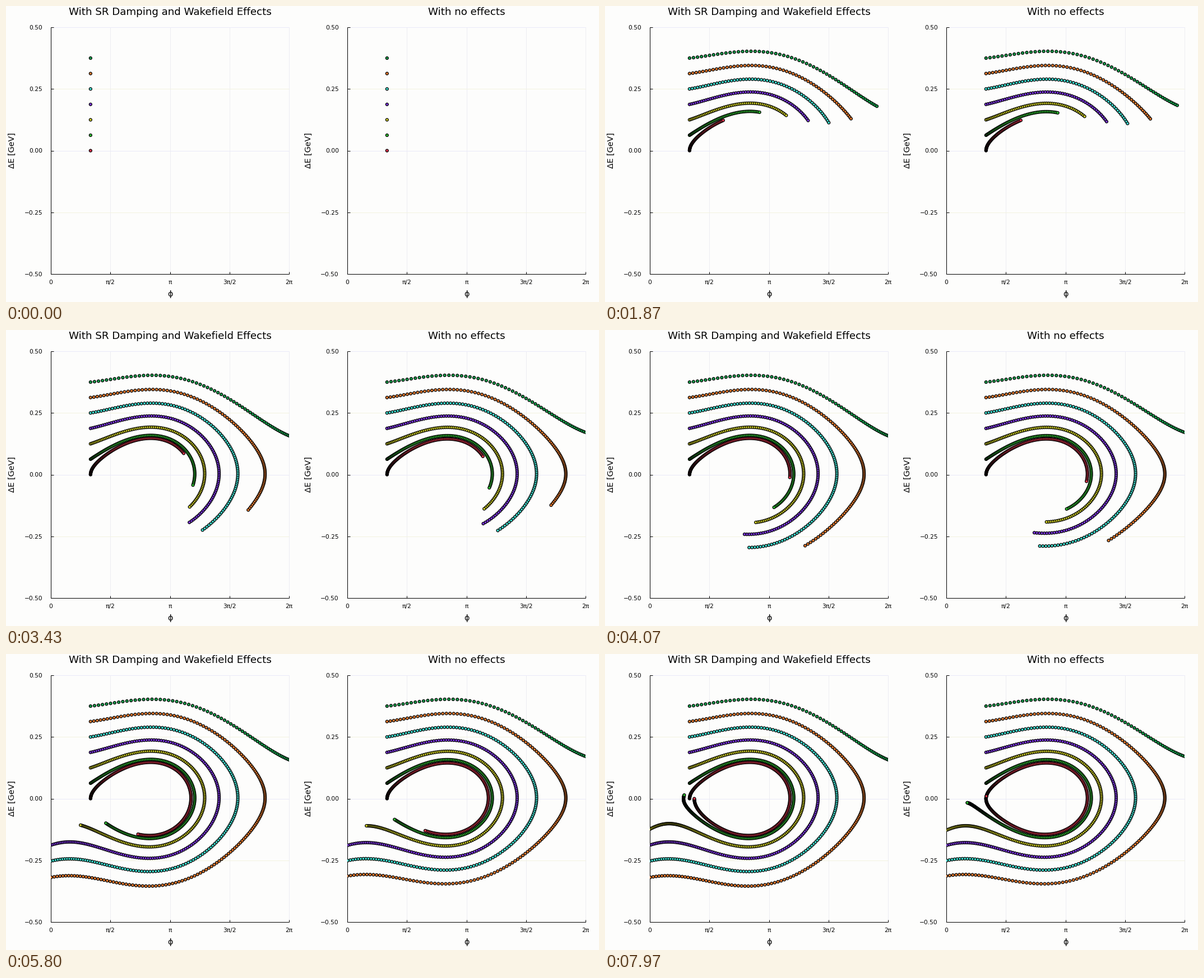
A matplotlib script for the animation above (8 s loop, 1058 by 529 pixels).

```python
import numpy as np
import matplotlib.pyplot as plt
from matplotlib.animation import FuncAnimation
from matplotlib.patches import Rectangle

W, H, DPI = 1058, 529, 100
TURNS, LOOP_MS = 240, 8000
TOP, BOTTOM, WIDTH = 38, 479, 425
BACK = "#fdfdfc"

# Ring constants, energies in GeV
VOLT = 0.005
PHI_S = 5 * np.pi / 6
SLIP = 2 * np.pi * 360 * 3.68e-4
RING_E = 3.0
RADIUS = 250

COLORS = ["#e0324b", "#2fbe32", "#cfcf28", "#7a35dc",
          "#3fdccd", "#e67a2e", "#14a04b"]


def track(effects):
    """Phase and energy offset of every particle on every turn."""
    n = len(COLORS)
    phi = np.full(n, np.pi / 3)
    dE = np.arange(n) / 16
    ref = RING_E
    turns = [(phi, dE)]
    for _ in range(TURNS - 1):
        dE = dE + VOLT * (np.sin(phi) - np.sin(PHI_S))
        if effects:
            dE = dE * (1 - 4 * 8.85e-5 * ref**3 / RADIUS)
            ref += VOLT * np.sin(PHI_S)
        phi = phi + SLIP / ref * dE
        turns.append((phi, dE))
    return np.array(turns)


def to_y(energy):
    return (TOP + BOTTOM) / 2 - (BOTTOM - TOP) * energy


def pt(px):
    return px * 72 / DPI


fig = plt.figure(figsize=(W / DPI, H / DPI), dpi=DPI, facecolor=BACK)
ax = fig.add_axes([0, 0, 1, 1])
ax.set(xlim=(0, W), ylim=(H, 0))
ax.axis("off")


def label(x, y, text, px, ha="center", **kw):
    ax.text(x, y, text, fontsize=pt(px), family="DejaVu Sans", ha=ha,
            va="baseline", color="black", **kw)


def line(xs, ys, color, z):
    ax.plot(xs, ys, color=color, lw=pt(1), zorder=z, snap=True,
            solid_capstyle="butt")


class Panel:
    def __init__(self, x0, title, effects):
        self.draw_frame(x0, title)
        path = track(effects)
        phi, dE = path[:, 0], path[:, 1]
        seen = (phi > -0.1) & (phi < 2 * np.pi + 0.1)
        x = x0 + WIDTH * phi / (2 * np.pi)
        self.points = np.column_stack([x[seen], to_y(dE)[seen]])
        self.counts = np.cumsum(seen.sum(axis=1))
        colors = np.tile(COLORS, (TURNS, 1))[seen]
        self.dots = ax.scatter(*self.points.T, s=pt(5)**2, c=colors,
                               edgecolors="black", linewidths=pt(1.2), zorder=3)
        self.dots.set_clip_path(Rectangle((x0, TOP), WIDTH, BOTTOM - TOP,
                                          transform=ax.transData))

    def draw_frame(self, x0, title):
        x1, mid = x0 + WIDTH, x0 + WIDTH / 2
        for i, text in enumerate(["0", "π/2", "π", "3π/2", "2π"]):
            x = x0 + WIDTH * i / 4
            if i:
                line([x, x], [TOP, BOTTOM], "#ededf2", 1)
            line([x, x], [BOTTOM, BOTTOM - 4.5], "black", 2)
            label(x, 497.3, text, 10.6)
        for i in range(5):
            energy = 0.5 - i / 4
            y = to_y(energy)
            line([x0, x1], [y, y], "#f2f2e0" if i % 2 else "#eaeaf8", 1)
            line([x0, x0 + 4.5], [y, y], "black", 2)
            label(x0 - 15, y + 4, f"{energy:.2f}".replace("-", "−"), 10.6, "right")
        line([x0, x0], [TOP, BOTTOM], "black", 2)
        line([x0, x1], [BOTTOM, BOTTOM], "black", 2)
        label(mid, 16, title, 18.25)
        label(mid, 518.5, "ϕ", 14.3)
        label(x0 - 65, to_y(0), "ΔE [GeV]", 14.3, rotation=90,
              rotation_mode="anchor")

    def show(self, turn):
        self.dots.set_offsets(self.points[:self.counts[turn]])
        return self.dots


panels = [Panel(80, "With SR Damping and Wakefield Effects", True),
          Panel(609, "With no effects", False)]


def update(turn):
    return [p.show(turn) for p in panels]


anim = FuncAnimation(fig, update, frames=TURNS, interval=LOOP_MS / TURNS,
                     init_func=lambda: update(0), repeat=True, repeat_delay=0,
                     blit=False)
plt.show()
```
